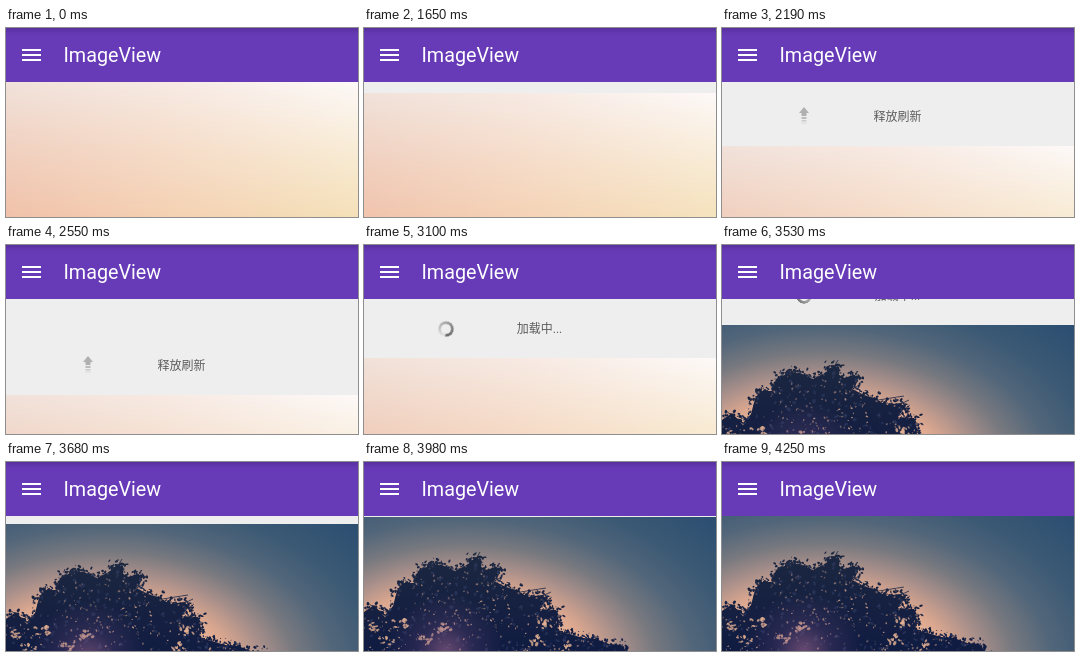
These frames come from a looping animation (352x189 px, 5350 ms). An HTML page with a canvas:

```html
<!DOCTYPE html>
<html lang="zh-CN">
<head>
<meta charset="utf-8">
<title>Pull to refresh</title>
<style>
html, body { margin: 0; width: 100%; height: 100%; overflow: hidden; background: #eee; }
.stage { position: relative; width: 352px; height: 189px; overflow: hidden; background: #eee; }
.stage * { position: absolute; }

.bar { inset: 0 0 auto; height: 54px; background: linear-gradient(#57309f, #6439b2 5px, #673ab7 9px); }
.menu, .menu::before, .menu::after { position: absolute; width: 19px; height: 2px; background: #fff; }
.menu { left: 16px; top: 26px; }
.menu::before, .menu::after { content: ""; left: 0; top: -5px; }
.menu::after { top: 5px; }
.title { left: 57.5px; top: 16px; color: #fff; font: 19.75px/24px Roboto, sans-serif; }

.sheet, .cue, .dusk, .spinner { animation: 5350ms step-end infinite; }
.sheet { left: 0; top: 54px; width: 352px; height: 189px; animation-name: drag; }
.cue { left: 0; top: -59px; width: 352px; height: 59px; visibility: hidden; }
.cue b { left: 0; width: 351px; top: 22px; text-align: center; white-space: nowrap; color: #5c5c5c;
  font: 12px/16px Roboto, "Noto Sans CJK SC", "Noto Sans CJK", sans-serif; }
.cue svg { left: 77px; top: 20px; }
.pull { animation-name: pull; }
.pull svg { transform: rotate(180deg); }
.release { animation-name: release; }
.loading { animation-name: loading; }
.spinner { left: 74px; top: 22px; width: 16px; height: 16px; border-radius: 50%;
  background: conic-gradient(from 330deg, #e6e6e6, #bbb 30%, #888 65%, #666 95%, #e6e6e6);
  -webkit-mask: radial-gradient(circle, #0000 4.6px, #000 5.3px 7.5px, #0000 8px);
  mask: radial-gradient(circle, #0000 4.6px, #000 5.3px 7.5px, #0000 8px);
  animation-name: spin; }

.photo { inset: 0; }
.dawn { background: linear-gradient(90deg, #f1e2da, #f7eae3 45%, #fdf9f8); }
.dawn i { inset: 0 0 54px; background: linear-gradient(90deg, #f0c1a9, #f4d0b2 45%, #f4e0b8);
  -webkit-mask: linear-gradient(#0000, #0008 50%, #000); mask: linear-gradient(#0000, #0008 50%, #000); }
.dusk { visibility: hidden; animation-name: dusk;
  background: radial-gradient(ellipse 350px 225px at 100px 152px,
    #f8c39b, #f3bc98 28%, #dba78f 37%, #a88f8a 46%, #78797f 55%, #52667a 66%, #3b5974 79%, #2a4d71); }
.flare { inset: 0; background: radial-gradient(circle at 82px 135px, #a0689099, #6a4a8044 28px, #0000 58px); }

@keyframes drag {
  0% { transform: none; }
  30.84% { transform: translateY(11px); }
  33.08% { transform: translateY(24px); }
  35.88% { transform: translateY(38px); }
  38.31% { transform: translateY(51px); }
  40.93% { transform: translateY(64px); }
  43.17% { transform: translateY(76px); }
  45.42% { transform: translateY(87px); }
  47.66% { transform: translateY(96px); }
  55.7% { transform: translateY(70px); }
  57.94% { transform: translateY(59px); }
  65.98% { transform: translateY(26px); }
  68.78% { transform: translateY(8px); }
  71.58% { transform: translateY(2px); }
  74.39% { transform: translateY(1px); }
  79.43%, 100% { transform: none; }
}
@keyframes pull { 0% { visibility: visible; } 40.93%, 100% { visibility: hidden; } }
@keyframes release { 0% { visibility: hidden; } 40.93% { visibility: visible; } 55.7%, 100% { visibility: hidden; } }
@keyframes loading { 0% { visibility: hidden; } 55.7%, 100% { visibility: visible; } }
@keyframes dusk { 0% { visibility: hidden; } 63.17%, 100% { visibility: visible; } }
@keyframes spin {
  0% { transform: rotate(180deg); }
  57.94% { transform: rotate(225deg); }
  60.74% { transform: rotate(290deg); }
  63.17%, 100% { transform: none; }
}
</style>
</head>
<body>
<div class="stage">
  <div class="sheet">
    <div class="cue pull">
      <svg width="10" height="17"><use href="#arrow"/></svg>
      <b>下拉刷新</b>
    </div>
    <div class="cue release">
      <svg width="10" height="17">
        <g id="arrow" fill="#b0b0b0">
          <path d="M5 0 10 6H7.5V9H2.5V6H0Z"/>
          <path d="M2.5 10h5v2h-5z" opacity=".8"/>
          <path d="M2.5 13h5v1.5h-5z" opacity=".55"/>
          <path d="M2.5 15.5h5v1h-5z" opacity=".35"/>
        </g>
      </svg>
      <b>释放刷新</b>
    </div>
    <div class="cue loading"><i class="spinner"></i><b>加载中...</b></div>
    <div class="photo dawn"><i></i></div>
    <div class="photo dusk">
      <canvas id="tree" width="352" height="189"></canvas>
      <i class="flare"></i>
    </div>
  </div>
  <div class="bar"><i class="menu"></i><span class="title">ImageView</span></div>
</div>
<script>
const ctx = document.getElementById('tree').getContext('2d');
let seed = 11;
const rand = () => (seed = seed * 16807 % 2147483647) / 2147483647;
const spread = size => (rand() + rand() - 1) * size;

const crown = [
  [0, 95], [10, 88], [20, 99], [29, 89], [33, 74], [38, 66], [50, 66], [54, 54], [63, 50],
  [69, 47], [80, 49], [91, 54], [103, 48], [112, 40], [117, 44], [117, 54], [133, 50],
  [136, 56], [130, 64], [142, 70], [154, 74], [164, 80], [178, 78], [183, 82], [176, 92],
  [192, 93], [195, 104], [193, 114], [206, 117], [219, 121], [232, 122], [245, 127],
  [257, 128], [264, 136], [264, 189], [0, 189]
];

function leaf(x, y, size) {
  ctx.beginPath();
  ctx.ellipse(x, y, size, size * (.4 + rand() * .4), rand() * 3, 0, 7);
  ctx.fill();
}

const bark = ctx.createLinearGradient(0, 36, 0, 135);
bark.addColorStop(0, '#1c2740');
bark.addColorStop(1, '#101b42');
ctx.fillStyle = bark;
ctx.beginPath();
crown.forEach(([x, y]) => ctx.lineTo(x, y));
ctx.fill();

// Ragged foliage along the outline
for (let i = 0; i < crown.length - 3; i++) {
  const [x, y] = crown[i], [nextX, nextY] = crown[i + 1];
  for (let n = 0; n < 22; n++) {
    const t = rand();
    leaf(x + (nextX - x) * t + spread(7), y + (nextY - y) * t + spread(7), .6 + rand() * 1.4);
  }
}

// Twigs reaching past the leaves
ctx.strokeStyle = bark;
ctx.lineWidth = .8;
ctx.stroke(new Path2D('M150 76 182 71M168 84 187 75M20 98 4 86M112 42 116 35'));

// Sky showing through the leaves
ctx.globalCompositeOperation = 'destination-out';
for (let n = 0; n < 420; n++) {
  ctx.globalAlpha = .25 + rand() * .5;
  leaf(rand() * 260, 48 + rand() * 87, .5 + rand() * .9);
}
ctx.globalAlpha = .75;
for (const [x, y] of [[10, 111], [24, 122], [38, 106], [79, 111], [62, 122], [180, 106], [172, 124], [200, 128]]) {
  for (let n = 0; n < 12; n++) leaf(x + spread(10), y + spread(6), .8 + rand() * 1.5);
}

// Lighter leaves inside the crown
ctx.globalCompositeOperation = 'source-atop';
ctx.globalAlpha = .5;
ctx.fillStyle = '#34406a';
for (let n = 0; n < 240; n++) leaf(rand() * 250, 45 + rand() * 95, .8 + rand() * 1.6);
</script>
</body>
</html>
```
